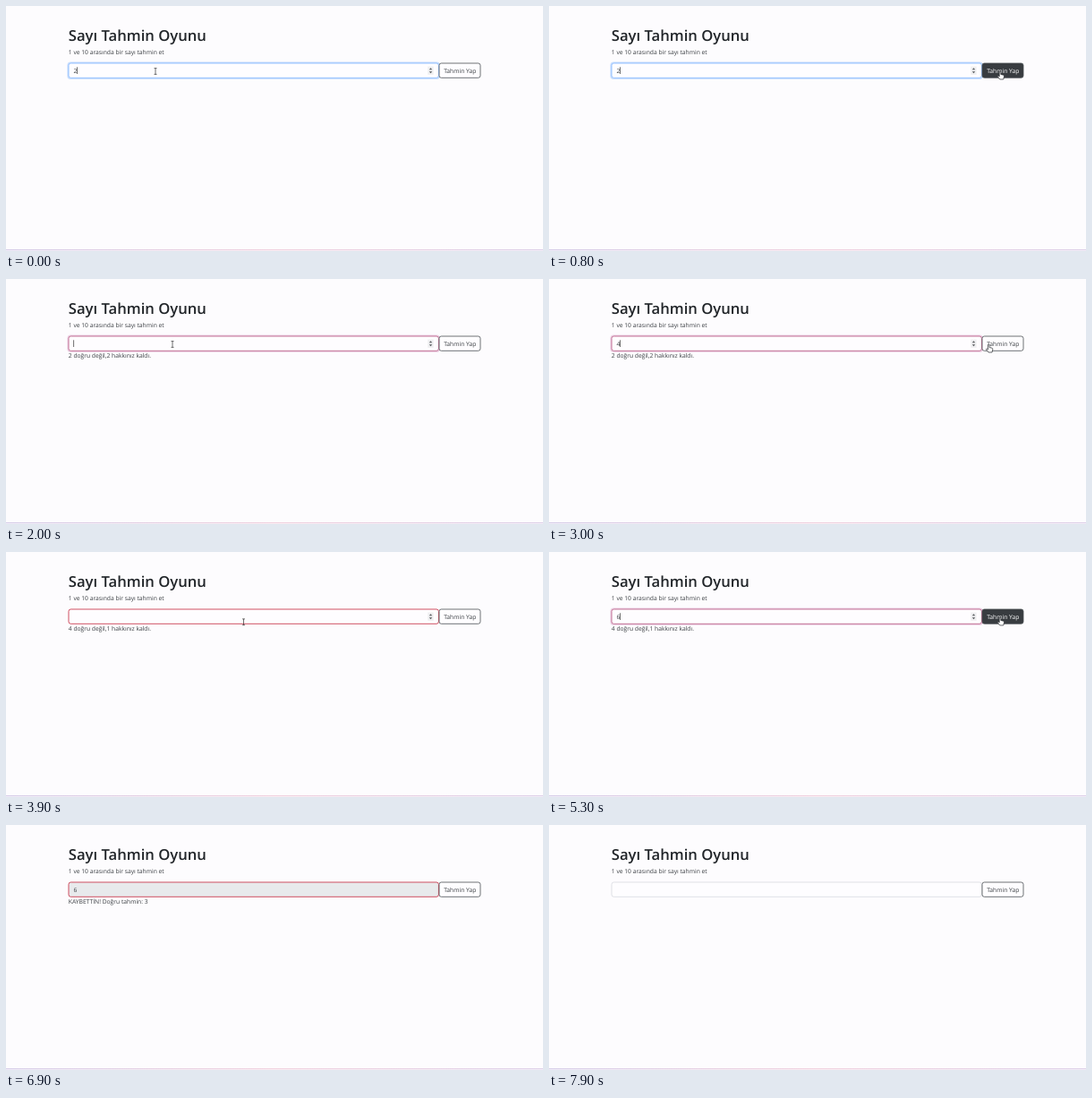
Recreate the animation shown at these times as an HTML page. Size 600 px wide and 274 px high, loop 8 s.

```html
<!DOCTYPE html>
<html lang="tr">
<head>
<meta charset="utf-8">
<title>Sayı Tahmin Oyunu</title>
<style>
  html, body { margin: 0; width: 100%; height: 100%; overflow: hidden; background: #fdfcfe; }
  svg { display: block; width: 100%; height: 100%; }
  text { font: 6.72px "Open Sans", "Noto Sans", sans-serif; fill: #3b3f43; text-rendering: geometricPrecision; }
  .title { font-size: 16.65px; font-weight: 600; fill: #212529; }
  .pointer path { fill: #fff; stroke: #25282b; stroke-width: .7; stroke-linejoin: round; }
  .pointer .beam { fill: none; stroke: #333; }
</style>
</head>
<body>
<svg viewBox="0 0 600 274">
  <defs>
    <linearGradient id="edge">
      <stop offset="0" stop-color="#d8d0ea"/>
      <stop offset=".5" stop-color="#f2d3e0"/>
      <stop offset="1" stop-color="#dfd2ea"/>
    </linearGradient>
  </defs>
  <rect width="600" height="274" fill="#fdfcfe"/>
  <rect y="272" width="600" height="1.4" fill="url(#edge)"/>
  <text class="title" x="69.8" y="39">Sayı Tahmin Oyunu</text>
  <text x="69.8" y="53.8">1 ve 10 arasında bir sayı tahmin et</text>

  <rect id="glow" x="69.2" y="63.2" width="415" height="18" rx="3" fill="none" stroke-width="1.6"/>
  <rect id="field" x="70" y="64" width="413.4" height="16.3" rx="2.4" stroke-width=".85"/>
  <text id="digit" x="75.4" y="74.6"></text>
  <path id="caret" d="M0 68.3V76" stroke="#333" stroke-width=".7"/>
  <g id="spinner">
    <rect x="471.3" y="67.6" width="6.4" height="9.2" fill="#efeff1"/>
    <path d="M472.8 71.2l1.7-2 1.7 2zM472.8 73.3l1.7 2 1.7-2z" fill="#55585b"/>
  </g>

  <rect id="button" x="484" y="64" width="46" height="16.3" rx="2.4" stroke="#4a4e52" stroke-width=".8"/>
  <text id="label" x="489.2" y="74.6">Tahmin Yap</text>
  <text id="message" x="69.8" y="88.4"></text>

  <g id="pointer" class="pointer">
    <path id="arrow" d="M0 0V7.2L1.7 5.7 2.8 8.2 4 7.7 2.9 5.2H5.2Z"/>
    <path id="hand" d="M-.8 .5Q0-.6 .8 .5V3.5L3.7 4.2Q4.6 4.5 4.5 5.5L3.8 9H-.3L-2.8 5.7Q-2.7 4.6-1.7 5L-.8 5.9Z"/>
    <path id="beam" class="beam" d="M-1.5-3.4H1.5M0-3.4V3.4M-1.5 3.4H1.5"/>
  </g>
</svg>
<script>
const LOOP = 8000, STEP = 100, RESET = 7900, GONE = 6900;
const TRIP = 500, RETURN = 800, PRESS_DELAY = 900, TYPE_DELAY = 300;
const BUTTON = { x: 504, y: 73 };
const EXIT = { x: 150, y: 8 };
const $ = id => document.getElementById(id);

const rounds = [
  { guess: "2", home: 167, leave: 100, reply: "2 doğru değil,2 hakkınız kaldı." },
  { guess: "4", home: 186, leave: 2600, reply: "4 doğru değil,1 hakkınız kaldı." },
  { guess: "6", home: 186, leave: 4600, reply: "KAYBETTİN! Doğru tahmin: 3" }
];
// Each round begins when the pointer is back in the field.
rounds.forEach((round, i) => {
  round.press = round.leave + PRESS_DELAY;
  round.start = i ? rounds[i - 1].press + RETURN : -LOOP;
  round.next = rounds[i + 1];
});

const mix = (a, b, k) => a + (b - a) * k;
const clamp = k => Math.min(1, Math.max(0, k));
const easeOut = k => 1 - (1 - clamp(k)) ** 2;
const easeIn = k => clamp(k) ** 3;
const color = (a, b, k) => `rgb(${a.map((v, i) => mix(v, b[i], k))})`;
const show = (id, on) => $(id).style.display = on ? "" : "none";

const roundAt = t => rounds.filter(r => r.start <= t).pop();

function pointerAt(t) {
  const { home, leave, press, next } = roundAt(t);
  if (t < press) {
    return { x: mix(home, BUTTON.x, easeOut((t - leave) / TRIP)), y: BUTTON.y };
  }
  if (!next) {
    const k = easeIn((t - press) / (GONE - press));
    return { x: mix(BUTTON.x, EXIT.x, k), y: mix(BUTTON.y, EXIT.y, k) };
  }
  const k = easeOut((t - press) / RETURN);
  return { x: mix(BUTTON.x, next.home, k), y: BUTTON.y + 15 * Math.sin(Math.PI * k) ** 3 };
}

const inRow = p => p.y >= 64 && p.y <= 80.3;
const overField = t => t < GONE && inRow(pointerAt(t)) && pointerAt(t).x < 484;
const overButton = t => t < GONE && inRow(pointerAt(t)) && pointerAt(t).x >= 484;
const hasFocus = t => t < roundAt(t).press;

// A 150 ms style transition: how much of the recent past the test held.
const transition = (test, t) => [50, 100, 150].filter(d => test(t - d)).length / 3;

function draw(t) {
  const round = roundAt(t);
  const answered = rounds.filter(r => r.press <= t).pop();
  const reset = t >= RESET;
  const invalid = answered && !reset;
  const lost = invalid && !answered.next;
  const typed = t >= round.start + TYPE_DELAY && (hasFocus(t) || lost);
  const focus = transition(hasFocus, t);
  const dark = transition(overButton, t);
  const beam = overField(t) && !lost;
  const hand = overButton(t);

  const rest = invalid ? [200, 48, 70] : [218, 219, 225];
  const active = invalid ? [186, 92, 134] : [134, 183, 254];
  $("field").setAttribute("stroke", color(rest, active, focus));
  $("field").setAttribute("fill", lost ? "#e8eaec" : "#fefdff");
  $("glow").setAttribute("stroke", invalid ? "#ecd2e4" : "#c8defd");
  $("glow").setAttribute("opacity", focus);
  $("digit").textContent = typed ? round.guess : "";
  $("caret").setAttribute("transform", `translate(${typed ? 79.5 : 75.6})`);
  show("caret", hasFocus(t));
  show("spinner", hasFocus(t) || beam);

  $("button").setAttribute("fill", color([254, 253, 255], [56, 60, 64], dark));
  $("label").style.fill = color([59, 63, 67], [255, 255, 255], dark);
  $("message").textContent = invalid ? answered.reply : "";

  const { x, y } = pointerAt(t);
  $("pointer").setAttribute("transform", `translate(${x} ${y})`);
  show("pointer", t < GONE);
  show("beam", beam);
  show("hand", hand);
  show("arrow", !beam && !hand);
}

const start = performance.now();
function tick() {
  const t = (performance.now() - start) % LOOP;
  draw(Math.floor(t / STEP) * STEP);
  requestAnimationFrame(tick);
}
tick();
</script>
</body>
</html>
```
